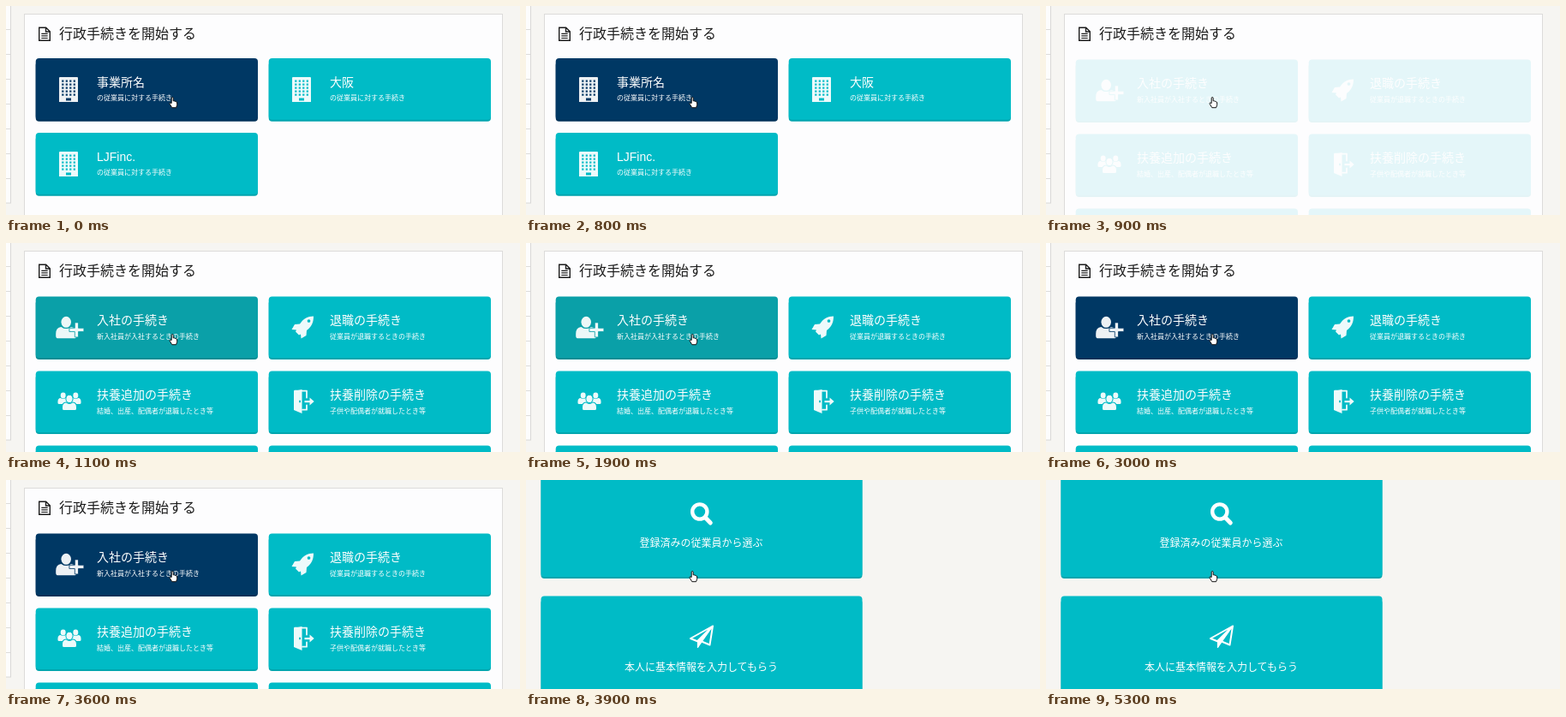
Animation, 600 px wide and 244 px high, one loop 5400 ms. Source, as an HTML page:

```html
<!DOCTYPE html>
<html lang="ja">
<head>
<meta charset="utf-8">
<style>
html, body { margin: 0; width: 100%; height: 100%; overflow: hidden; background: #f6f5f2; }
svg { display: block; width: 600px; height: 244px; }
text { font-family: "Noto Sans CJK JP", "Noto Sans CJK", sans-serif; fill: #fff; }
.title { font-size: 14px; font-weight: 500; }
.latin { font-family: "Liberation Sans", Arial, sans-serif; }
.note { font-size: 8px; }
.label { font-size: 12px; text-anchor: middle; }
.heading { font-size: 16px; fill: #1c1c1c; }
.icon { fill: #fff; opacity: .93; }
.line { fill: none; stroke: #fff; stroke-linejoin: round; stroke-linecap: round; }
</style>
</head>
<body>
<svg viewBox="0 0 600 244">
  <g id="panel">
    <rect x="-2" y="-2" width="7.5" height="232" fill="#fdfdfd" stroke="#d9d8d6"/>
    <path id="rows" stroke="#dddcda"/>
    <rect x="21.5" y="9.5" width="558" height="250" fill="#fdfdfe" stroke="#dcdbda"/>
    <g fill="none" stroke="#1c1c1c" stroke-width="1.4">
      <path d="M38.7 25.2h8l4.6 4.6v10.5h-12.6zM46.5 25.2v4.8h4.8"/>
      <path d="M41.3 32.3h7.4M41.3 34.9h7.4M41.3 37.5h7.4" stroke-width="1.2"/>
    </g>
    <text class="heading" x="62" y="38">行政手続きを開始する</text>
  </g>
  <g id="offices"></g>
  <g id="tasks"></g>
  <g id="choices"></g>
  <path fill="#fff" stroke="#111" stroke-linejoin="round"
    d="M193.200 113.500V107.700q0-1.200 1-1.200t1 1.200v3.200q1.300-.6 1.700.4q1.200-.4 1.500.6q1.300-.2 1.300 1v2.600l-1.100 3.200h-4.800l-2.600-4.300q-.6-1.400.5-1.400z"/>
</svg>
<script>
const TEAL = [0, 187, 198], HOVER = [10, 160, 168], PRESSED = [2, 70, 109], NAVY = [0, 56, 100];
const LOOP = 5400, STEP = 100;
const $ = id => document.getElementById(id);
const rgb = c => `rgb(${c.map(Math.round)})`;
const shade = c => rgb(c.map(v => v * .88));

function building() {
  let d = "M28 22h20q1 0 1 1v28h-22v-28q0-1 1-1z";
  for (let r = 0; r < 5; r++)
    for (let c = 0; c < 4; c++) d += `M${30.2 + c * 4.5} ${25.5 + r * 4}h2.2v2.2h-2.2z`;
  return `<path fill-rule="evenodd" d="${d}M35 46.5h6v3h-6z"/>`;
}

const person = (x, y, s) => `<g transform="translate(${x} ${y}) scale(${s})">
  <ellipse cy="-5.8" rx="6" ry="6.8"/>
  <path d="M-12.5 11v-2.500q0-8 6.500-8.500q6 4.600 12 0q6.500 .5 6.500 8.500v2.500q0 3-3 3h-19q-3 0-3-3z"/></g>`;

const ICONS = {
  building: building(),
  join: person(35.2, 35.5, .96) +
    `<path d="M45.3 30.5h4.200v6.400h6.400v4.200h-6.400v6.400h-4.200v-6.400h-6.400v-4.200h6.400z" stroke="currentColor" stroke-width=".8"/>`,
  rocket: `<path fill-rule="evenodd" d="M52 23c-7 0-12 3-16 9l-6 .5-3.500 6 5.500.5-1 2 4 4 2-1 .5 5 6-3.500.5-6c5.500-4 8-9 8-16.500zM46.500 26.800a1.800 1.800 0 1 0 .01 0z"/>`,
  group: person(31.7, 31.5, .5) + person(46.3, 31.5, .5) +
    `<g stroke="currentColor" stroke-width="1.5">${person(39, 36.5, .68)}</g>`,
  door: `<path fill-rule="evenodd" d="M29 23.500l9.500-2v28l-9.500-4zM36 34.200a1 1.500 0 1 0 .01 0z"/>
    <path class="line" stroke-width="1.800" d="M30 23.200h14v8M44 40v5.300h-5"/>
    <path d="M41.500 34.500h6v-3.300l5.200 4.500-5.200 4.500v-3.300h-6z"/>`
};

// One tile: darker base showing 2px below the face.
const tile = (x, y, w, h) =>
  `<rect class="base" x="${x}" y="${y + 4}" width="${w}" height="${h - 4}" rx="4" fill="${shade(TEAL)}"/>
   <rect class="face" x="${x}" y="${y}" width="${w}" height="${h - 2}" rx="4" fill="${rgb(TEAL)}"/>`;

function card(col, row, top, icon, title, note, cls = "") {
  return `<g transform="translate(${35 + col * 272} ${top + row * 87})" color="${rgb(TEAL)}">
    ${tile(-.3, 0, 259.3, 73.7)}
    <g class="icon">${ICONS[icon] || ""}</g>
    <text class="title ${cls}" x="71" y="32.7">${title}</text>
    <text class="note" x="71" y="49.2">${note}</text></g>`;
}

const staff = "の従業員に対する手続き";
$("offices").innerHTML =
  card(0, 0, 61, "building", "事業所名", staff) +
  card(1, 0, 61, "building", "大阪", staff) +
  card(0, 1, 61, "building", "LJFinc.", staff, "latin");

$("tasks").innerHTML =
  card(0, 0, 62.4, "join", "入社の手続き", "新入社員が入社するときの手続き") +
  card(1, 0, 62.4, "rocket", "退職の手続き", "従業員が退職するときの手続き") +
  card(0, 1, 62.4, "group", "扶養追加の手続き", "結婚、出産、配偶者が退職したとき等") +
  card(1, 1, 62.4, "door", "扶養削除の手続き", "子供や配偶者が就職したとき等") +
  card(0, 2, 62.4, "", "", "") + card(1, 2, 62.4, "", "", "");

$("choices").innerHTML = tile(17.5, -40, 375, 155) + tile(17.5, 135.5, 375, 155) +
  `<g class="line">
    <circle cx="202.8" cy="37" r="8.6" stroke-width="4.4"/>
    <path d="M209.5 44l5.8 6" stroke-width="5"/>
    <path d="M218 170.5l-3.5 22-9.5-4M218 170.5l-26 14.5 8 3.200 18-17.700" stroke-width="2"/>
    <path d="M200.5 188.5v7l4.500-6.500 13-18.500z" stroke-width="1.2" fill="#fff"/>
  </g>
  <text class="label" x="204.5" y="77.5">登録済みの従業員から選ぶ</text>
  <text class="label" x="204.5" y="222.5">本人に基本情報を入力してもらう</text>`;

$("rows").setAttribute("d", Array.from({ length: 7 }, (_, i) => `M0 ${27.5 + i * 29}h5`).join(""));

function paint(group, color) {
  const first = $(group).firstElementChild;
  first.style.color = rgb(color);
  first.querySelector(".face").setAttribute("fill", rgb(color));
  first.querySelector(".base").setAttribute("fill", shade(color));
}

// [time, value] steps, each held until the next one
const TASKS_AT = 900, CHOICES_AT = 3900;
const FADE_IN = [[0, 0], [TASKS_AT, .1], [1000, .55], [1100, 1], [CHOICES_AT, 0]];
const CARD_COLOR = [[0, TEAL], [1100, HOVER], [2200, PRESSED], [3000, NAVY]];
const at = (steps, t) => steps.reduce((v, s) => t >= s[0] ? s[1] : v, 0);

paint("offices", NAVY);
const start = performance.now();
function draw() {
  const t = Math.floor((performance.now() - start) % LOOP / STEP) * STEP;
  const last = t >= CHOICES_AT;
  $("panel").style.opacity = last ? 0 : 1;
  $("choices").style.opacity = last ? 1 : 0;
  $("offices").style.opacity = t < TASKS_AT ? 1 : 0;
  $("tasks").style.opacity = at(FADE_IN, t);
  paint("tasks", at(CARD_COLOR, t));
  requestAnimationFrame(draw);
}
draw();
</script>
</body>
</html>
```
